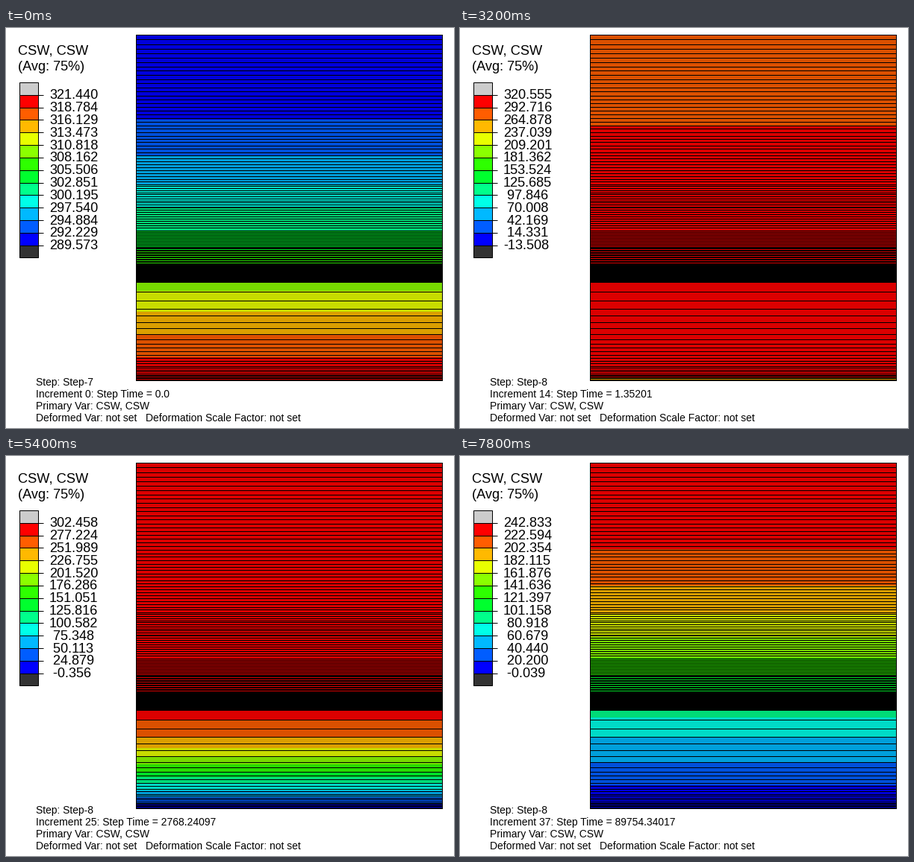
Animation of 600 by 537 pixels, one loop 8000 ms. Source, as a matplotlib script:

```python
import math

import matplotlib.pyplot as plt
import numpy as np
from matplotlib.animation import FuncAnimation
from matplotlib.patches import Rectangle

W, H, DPI = 600, 537, 100
FRAMES, INTERVAL = 40, 200
LEFT, RIGHT, TOP, BOTTOM = 174, 584, 9, 473
PX = 72 / DPI

plt.rcParams["font.family"] = "Liberation Sans"

# Contour palette from the lowest band to the highest
BANDS = np.array([
    (0, 0, 255), (0, 93, 255), (0, 185, 255), (0, 255, 232),
    (0, 255, 139), (0, 255, 46), (46, 255, 0), (139, 255, 0),
    (232, 255, 0), (255, 185, 0), (255, 93, 0), (255, 0, 0)]) / 255
SHADE = 0.862

# Starting profile: band level reached at each height
START_Y = [9, 65, 111, 122, 171, 209, 241, 271, 297, 322, 352, 381, 411, 442, 473]
START_LEVEL = [0, 0.25, 0.82] + list(range(1, 13))
START_MIN, START_MAX = 289.573, 321.440

# Value range at a few increments
KEY_INC = [1, 7, 14, 21, 25, 29, 37]
KEY_MAX = [320.720, 320.689, 320.555, 314.798, 302.458, 290.021, 242.833]
KEY_MIN = [-27.412, -26.565, -13.508, -1.540, -0.356, -0.101, -0.039]

# Late stage: distance of the band edges from the bottom
EDGE_INC = [25, 29, 37]
EDGES = np.array([
    [7, 16, 25, 34, 42, 49, 59, 70, 81, 97, 120],
    [20, 41, 62, 85, 103, 120, 165, 185, 209, 230, 261],
    [32, 63, 97, 122, 151, 177, 202, 230, 261, 300, 348]])

rows = np.arange(TOP, BOTTOM + 1)
depth = BOTTOM - rows
start = START_MIN + (START_MAX - START_MIN) / 12 * np.interp(rows, START_Y, START_LEVEL)


def step_time(inc):
    """Time step doubles each increment until it reaches its limit."""
    if inc <= 3:
        return 0.00033 * inc
    if inc <= 27:
        return 8.25e-5 * (2 ** inc + 4)
    return 25260.19617 + (inc - 29) * 8061.768


def log_blend(inc, incs, values):
    x = np.log([step_time(i) for i in incs])
    return math.exp(np.interp(math.log(step_time(inc)), x, np.log(values)))


def value_range(inc):
    if inc == 0:
        return START_MIN, START_MAX
    drop = log_blend(inc, KEY_INC, [START_MAX - v for v in KEY_MAX])
    return -log_blend(inc, KEY_INC, [-v for v in KEY_MIN]), START_MAX - drop


def band_rows(inc, low, high):
    if inc >= 25:
        edges = [log_blend(inc, EDGE_INC, col) for col in EDGES.T]
        return np.searchsorted(edges, depth, side="right")
    field = start
    if inc > 0:
        reach = max(1.0, 102 * math.sqrt(step_time(inc) / 2768))
        field = start * np.array([math.erf(d / reach) for d in depth])
    return np.clip((field - low) / (high - low) * 12, 0, 11).astype(int)


def graded(y, size, ratio, end):
    lines = []
    while y < end:
        lines.append(int(round(y)))
        y += size
        size *= ratio
    return lines


def stepped(y, steps, end):
    lines, i = [], 0
    while y < end:
        lines.append(y)
        y += steps[i % len(steps)]
        i += 1
    return lines


mesh = (graded(TOP, 6.35, 0.9865, 212) + stepped(212, (3, 3, 3, 2), 241)
        + stepped(241, (3,), 271) + stepped(272, (2,), 295)
        + stepped(295, (1, 2), 316) + list(range(316, 341))
        + graded(341, 13, 0.91, BOTTOM) + [BOTTOM])
mesh = np.array(sorted(set(mesh))) - TOP


def plot_image(inc, low, high):
    colors = BANDS[band_rows(inc, low, high)] * SHADE
    colors[mesh] = 0
    img = np.repeat(colors[:, None, :], RIGHT - LEFT + 1, axis=1)
    img[:, [0, -1]] = 0
    return img


fig = plt.figure(figsize=(W / DPI, H / DPI), dpi=DPI, facecolor="white")
ax = fig.add_axes([0, 0, 1, 1])


def label(x, y, text, size):
    return ax.text(x, y, text, fontsize=size * PX, color="black", va="baseline")


picture = ax.imshow(plot_image(0, START_MIN, START_MAX), interpolation="nearest",
                    extent=(LEFT, RIGHT + 1, BOTTOM + 1, TOP), aspect="auto")
ax.set_xlim(0, W)
ax.set_ylim(H, 0)
ax.axis("off")

label(16.5, 36, "CSW, CSW", 18.3)
label(16.5, 57, "(Avg: 75%)", 18.2)

CELL = 16.82
swatches = [(0.8, 0.8, 0.8), *BANDS[::-1], (0.2, 0.2, 0.2)]
for i, color in enumerate(swatches):
    y0, y1 = (round(73 + CELL * k) - 0.5 for k in (i, i + 1))
    ax.add_patch(Rectangle((17.5, y0), 25, y1 - y0, facecolor=color,
                           edgecolor="black", linewidth=PX))
    if 0 < i:
        ax.plot([42, 50], [y0, y0], color="black", lw=PX, solid_capstyle="butt")

values = [label(58, 95.3 + CELL * i, "", 18.1) for i in range(13)]

step_text = label(40, 480, "", 13.85)
inc_text = label(40, 496, "", 13.85)
label(40, 512, "Primary Var: CSW, CSW", 13.85)
label(40, 528, "Deformed Var: not set   Deformation Scale Factor: not set", 13.85)


def update(frame):
    if frame < 2:
        step, inc, field_inc, time = 7, frame, 0, float(frame)
    else:
        step, inc = 8, frame - 2
        field_inc, time = inc, step_time(inc)
    low, high = value_range(field_inc)
    picture.set_data(plot_image(field_inc, low, high))
    for i, text in enumerate(values):
        text.set_text(f"{high + (low - high) * i / 12:7.3f}")
    clock = f"{time:.1f}" if step == 7 or inc == 0 else f"{time:.5f}"
    step_text.set_text(f"Step: Step-{step}")
    inc_text.set_text(f"Increment {inc}: Step Time = {clock}")
    return [picture, step_text, inc_text, *values]


anim = FuncAnimation(fig, update, frames=FRAMES, interval=INTERVAL,
                     init_func=lambda: update(0), repeat=True, repeat_delay=0)
plt.show()
```
